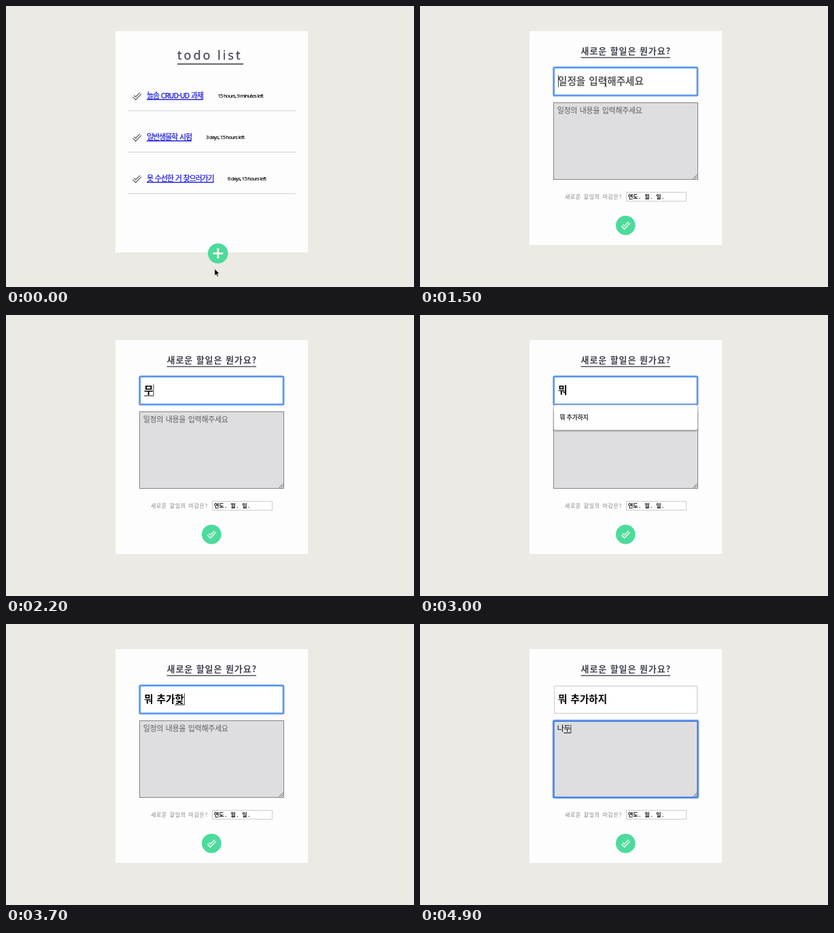
Recreate the animation shown at these times as an HTML page. Size 600 px wide and 414 px high, loop 5 s.

```html
<!DOCTYPE html>
<html lang="ko">
<head>
<meta charset="utf-8">
<title>todo list</title>
<style>
  html, body { margin: 0; width: 100%; height: 100%; overflow: hidden; background: #ebeae4; }
  svg { display: block; width: 600px; height: 414px; }
  text { font-family: "Noto Sans CJK KR", "Noto Sans CJK", sans-serif; white-space: pre; }
  .title { font: 18px "Noto Sans", sans-serif; letter-spacing: 3px; fill: #4b4b58; stroke: #4b4b58; stroke-width: .3; }
  .question { font-size: 13px; font-weight: 700; letter-spacing: .92px; fill: #444653; }
  .link { font-size: 11px; letter-spacing: -1.1px; word-spacing: .8px; fill: #0000d8; stroke: #0000d8; stroke-width: .15; text-decoration: underline; }
  .left { font: 7.5px "Noto Sans", sans-serif; letter-spacing: -.7px; fill: #111; stroke: #111; stroke-width: .2; }
  .name { font-size: 14.6px; font-weight: 700; word-spacing: 1px; }
  .body { font-size: 11px; letter-spacing: -.3px; word-spacing: .8px; }
  .label { font-size: 8px; letter-spacing: .7px; word-spacing: .6px; fill: #858585; }
  .date { font: 700 8px "Liberation Mono", "Noto Sans CJK KR", monospace; fill: #111; }
  .option { font: 500 8.7px Inter, "Noto Sans CJK KR", sans-serif; fill: #111; stroke: #111; stroke-width: .2; }
  .hint { fill: #5e5e5e; }
  .menu rect { fill: #fefefe; stroke: #bbb; stroke-width: .6; filter: drop-shadow(0 1px 1.2px #0007); }
  .ring { fill: none; stroke: #5a98ee; stroke-width: 2.8; }
</style>
</head>
<body>
<svg viewBox="0 0 600 414">
  <defs>
    <path id="tick" d="M-5.2 .4L-2 3.6L5.2-3.8" fill="none"/>
  </defs>
  <rect width="600" height="414" fill="#ebeae4"/>

  <g id="list">
    <rect x="161" y="37" width="283" height="326" fill="#fefdfe"/>
    <text class="title" x="252" y="78.5">todo list</text>
    <path d="M252 85.5H349" stroke="#5b5b66" stroke-width="2"/>
    <g id="items"></g>
    <circle cx="311.7" cy="364.5" r="14.8" fill="#4cdb9b"/>
    <path d="M304.2 364.5H319.2M311.7 357V372" stroke="#f1f3ec" stroke-width="3"/>
  </g>

  <g id="form">
    <rect x="161" y="37" width="283" height="315" fill="#fefdfe"/>
    <text class="question" x="236.5" y="70.5">새로운 할일은 뭔가요?</text>
    <path d="M236.5 76H368" stroke="#55565f" stroke-width="1.4"/>
    <rect x="197.5" y="91.5" width="210" height="40" fill="#fff" stroke="#ccc"/>
    <rect x="196.5" y="142.5" width="212" height="113" fill="#dedde0" stroke="#858585"/>
    <path d="M401.5 254.5L407.5 248.5M404.5 254.5L407.5 251.5" stroke="#555" stroke-width=".9"/>
    <text class="label" x="213" y="283.5">새로운 할일의 마감은?</text>
    <rect x="303.5" y="274.5" width="88" height="13" fill="#fff" stroke="#ccc"/>
    <text class="date" x="306" y="283.5">연도. 월. 일.</text>
    <circle cx="302.3" cy="323.2" r="14.3" fill="#4cdb9b"/>
    <g transform="translate(302.5 322.8)">
      <use href="#tick" stroke="#f6fbf4" stroke-width="4.6"/>
      <use href="#tick" stroke="#4cdb9b" stroke-width="1.7"/>
    </g>
    <rect id="nameRing" class="ring" x="196.7" y="90.7" width="211.3" height="41.2" rx="1.5"/>
    <g id="bodyRing">
      <rect class="ring" x="195.8" y="142" width="213.4" height="114" rx="2" style="stroke:#9cc0f4"/>
      <rect class="ring" x="196.7" y="143" width="211.6" height="112.4" rx="1" style="stroke:#3c78e4;stroke-width:2"/>
    </g>
    <g id="fields"></g>
    <g id="history" class="menu"><rect x="196.7" y="132.5" width="255.3" height="164.5" rx="2.5"/></g>
    <g id="match" class="menu"><rect x="196.7" y="132.5" width="211.6" height="37" rx="2.5"/></g>
  </g>

  <g id="pointer">
    <path id="arrow" d="M0 0V10.2L2.4 8L4 11.6L5.7 10.8L4.1 7.3H7.3Z" fill="#000" stroke="#fff" stroke-width=".7"/>
    <path id="hand" d="M-1 7V1.2a1.1 1.1 0 0 1 2.2 0V5q1.8-.8 2.2.4q1.7-.5 2 .5q1.6-.2 1.6 1V9q-.3 1.8-1.2 2.6V13H1V12L-2.4 8.2q-.6-1.8 1.4-1.2ZM2.3 8V10.5M4.2 8V10.5" fill="#fff" stroke="#111" stroke-width=".9"/>
    <path id="beam" d="M-2-5.5Q0-5.5 0-4.5Q0-5.5 2-5.5M0-4.5V4.5M-2 5.5Q0 5.5 0 4.5Q0 5.5 2 5.5M-1.2 2H1.2" fill="none" stroke="#333" stroke-width=".8"/>
  </g>
</svg>
<script>
const LOOP = 5000, STEP = 100;
const OPEN_FORM = 600, FOCUS_NAME = 1500, OPEN_HISTORY = 1600, TYPE_NAME = 2100, FOCUS_BODY = 4000;
const ENTRY = '뭐 추가하지';
const $ = id => document.getElementById(id);

function add(parent, tag, attrs, content = '') {
  const el = document.createElementNS('http://www.w3.org/2000/svg', tag);
  for (const key in attrs) el.setAttribute(key, attrs[key]);
  el.textContent = content;
  return parent.appendChild(el);
}
const show = (el, on) => { el.style.display = on ? '' : 'none'; };

[['늘솜 CRUD-UD 과제', 311.5, '15 hours, 9 minutes left'],
 ['일반생물학 시험', 294, '3 days, 15 hours left'],
 ['옷 수선한 거 찾으러가기', 326, '6 days, 15 hours left']].forEach(([task, x, left], i) => {
  const row = add($('items'), 'g', { transform: `translate(0 ${i * 61})` });
  const icon = add(row, 'g', { transform: 'translate(192.7 132.4)' });
  add(icon, 'use', { href: '#tick', stroke: '#5c5c5c', 'stroke-width': 4.2 });
  add(icon, 'use', { href: '#tick', stroke: '#fefdfe', 'stroke-width': 1.7 });
  add(row, 'text', { class: 'link', x: 207, y: 136.2 }, task);
  add(row, 'text', { class: 'left', x, y: 135 }, left);
  add(row, 'path', { d: 'M179 154.3H426', stroke: '#cdd0cc' });
});

function addOptions(menu, options) {
  options.forEach((option, i) =>
    add(menu, 'text', { class: 'option', x: 205.5, y: 154.2 + i * 25.6 }, option));
}
addOptions($('history'), [
  '하잉', '들꽃 밭의 계절순환적 변화와 마을공동체의 기록-탁보람,견솔비.',
  'you are what you think', 'a windy eve in marlport', '옷 수선한 거 찾으러가기', '0411 1차시']);
addOptions($('match'), [ENTRY]);

// Each entry: time, committed text, syllable still being composed
const nameTyping = [
  [2100, '', 'ㅁ'], [2200, '', '무'], [2300, '', '뭐'], [2500, '뭐 ', ''],
  [3100, '뭐 ', 'ㅊ'], [3200, '뭐 ', '추'], [3300, '뭐 ', '축'], [3400, '뭐 추', '가'],
  [3500, '뭐 추', '갛'], [3600, '뭐 추가', '하'], [3700, '뭐 추가', '핮'],
  [3800, '뭐 추가하', '지'], [4000, ENTRY, '']];
const bodyTyping = [[4600, '', 'ㄴ'], [4700, '', '나'], [4800, '', '낟'], [4900, '나', '두']];

function makeField(cls, x, y, hint, typing, top, bottom) {
  const text = add($('fields'), 'text', { class: cls, x, y });
  const mark = add($('fields'), 'path', { stroke: '#111' });
  const caret = add($('fields'), 'path', { stroke: '#222', 'stroke-width': .9 });
  const measure = s => { text.textContent = s; return s ? text.getComputedTextLength() : 0; };
  return (t, caretOn) => {
    const [, done, composing] = typing.filter(([at]) => at <= t).pop() || [0, '', ''];
    const value = done + composing;
    const from = x + measure(done), to = x + measure(value);
    text.textContent = value || hint;
    text.classList.toggle('hint', !value);
    mark.setAttribute('d', composing ? `M${from} ${bottom - .5}H${to}` : '');
    caret.setAttribute('d', caretOn ? `M${to + .5} ${top}V${bottom}` : '');
    return value;
  };
}
const drawName = makeField('name', 203, 116.2, '일정을 입력해주세요', nameTyping, 102, 119.5);
const drawBody = makeField('body', 201.7, 158.3, '일정의 내용을 입력해주세요', bodyTyping, 148.5, 161);

const between = (t, a, b) => t >= a && t < b;
const ease = u => { u = Math.min(1, Math.max(0, u)); return u * u * (3 - 2 * u); };
const near = (x, y, cx, cy) => Math.hypot(x - cx, y - cy) < 15;

function drawPointer(t) {
  const toAdd = ease(t / 500), toName = ease((t - 900) / 500);
  const x = 306.8 + 4.2 * toAdd - 38 * toName;
  const y = 387.3 - 21.6 * toAdd - 252.2 * toName;
  const onForm = t >= OPEN_FORM;
  const overField = onForm && x > 196 && x < 409 && (between(y, 91, 132) || between(y, 142, 256));
  const overButton = onForm ? toName === 0 || near(x, y, 302.5, 323) : near(x, y, 312, 364.5);
  show($('pointer'), t < TYPE_NAME);
  $('pointer').setAttribute('transform', `translate(${x} ${y})`);
  show($('beam'), overField);
  show($('hand'), overButton);
  show($('arrow'), !overField && !overButton);
}

function draw(now) {
  const t = Math.floor((now % LOOP) / STEP) * STEP;
  const nameFocused = between(t, FOCUS_NAME, FOCUS_BODY);
  const bodyFocused = t >= FOCUS_BODY;
  show($('list'), t < OPEN_FORM);
  show($('form'), t >= OPEN_FORM);
  show($('nameRing'), nameFocused);
  show($('bodyRing'), bodyFocused);
  const name = drawName(t, nameFocused && t !== 2000 && t !== 3000);
  drawBody(t, bodyFocused && !between(t, 4400, 4600));
  show($('history'), between(t, OPEN_HISTORY, TYPE_NAME));
  show($('match'), nameFocused && name !== '' && ENTRY.startsWith(name));
  drawPointer(t);
}

function tick(now) {
  draw(now);
  requestAnimationFrame(tick);
}
draw(0);
requestAnimationFrame(tick);
</script>
</body>
</html>
```
